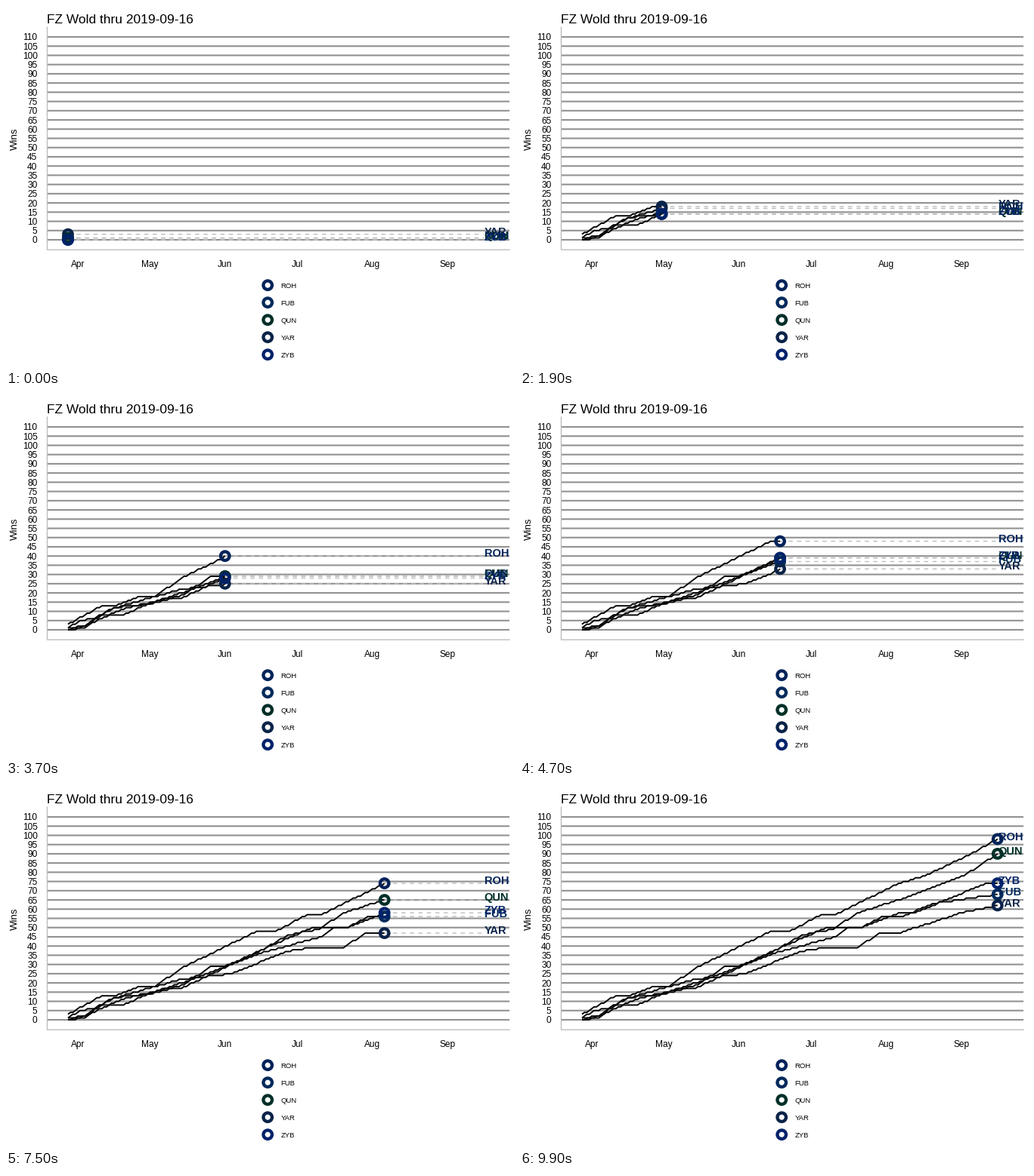
A matplotlib script that plays this animation: 672x480 px, repeating every 10000 ms.

```python
import numpy as np
import matplotlib.pyplot as plt
from matplotlib.animation import FuncAnimation
from matplotlib.patches import Circle

W, H = 672, 480
PT = 0.72                      # points per pixel at 100 dpi
FRAMES, LAST_DAY = 100, 172
LEFT, TOP, RIGHT, BOTTOM = 54.5, 28, 666, 323

plt.rcParams["font.family"] = "Liberation Sans"

# name -> (colour, turning points of the season as (day, wins))
TEAMS = {
    "ROH": ("#00235a", [
        (0, 1), (7, 2), (17, 11), (36, 18), (47, 28), (78, 48), (86, 48),
        (99, 57), (105, 57), (131, 74), (142, 78), (161, 90), (172, 98)]),
    "FUB": ("#002a5c", [
        (0, 0), (7, 1), (13, 8), (23, 8), (33, 14), (47, 20), (82, 37),
        (105, 45), (110, 50), (116, 50), (124, 56), (133, 56), (145, 63),
        (172, 68)]),
    "QUN": ("#002f28", [
        (0, 1), (5, 5), (11, 6), (19, 12), (34, 14), (48, 19), (59, 29),
        (65, 29), (101, 50), (105, 50), (114, 58), (131, 65), (158, 78),
        (172, 90)]),
    "YAR": ("#0a2348", [
        (0, 3), (14, 13), (20, 13), (29, 18), (36, 18), (47, 22), (68, 25),
        (90, 37), (100, 39), (114, 39), (123, 47), (131, 47), (157, 58),
        (172, 62)]),
    "ZYB": ("#00226b", [
        (0, 0), (7, 2), (22, 11), (41, 17), (47, 17), (82, 39), (91, 46),
        (107, 50), (116, 50), (131, 58), (138, 58), (167, 74), (172, 74)]),
}
MONTHS = {"Apr": 30, "May": 31, "Jun": 30, "Jul": 31, "Aug": 31, "Sep": 30}


def px(day):
    return 82 + 3.196 * day


def py(wins):
    return 310 - 2.4455 * wins


def pixel_axes(x0, y0, x1, y1):
    ax = fig.add_axes([x0 / W, 1 - y1 / H, (x1 - x0) / W, (y1 - y0) / H])
    ax.set(xlim=(x0, x1), ylim=(y1, y0))
    ax.patch.set_visible(False)
    ax.axis("off")
    return ax


def label(ax, x, y, text, size, **kw):
    kw = {"va": "baseline", "color": "black", **kw}
    return ax.text(x, y, text, fontsize=size * PT, **kw)


def ring(ax, x, y, color, **kw):
    return ax.add_patch(Circle((x, y), 5.75, fill=False, ec=color,
                               lw=4.3 * PT, **kw))


fig = plt.figure(figsize=(W / 100, H / 100), dpi=100, facecolor="white")
stage = pixel_axes(0, 0, W, H)
panel = pixel_axes(LEFT, TOP, RIGHT, BOTTOM)

for wins in range(0, 111, 5):
    panel.plot([LEFT, RIGHT], [py(wins)] * 2, color="#929292", lw=2.1 * PT,
               snap=False, zorder=1)
    label(stage, 41.5, py(wins) + 4.5, str(wins), 11.9, ha="right")
stage.plot([LEFT, LEFT, RIGHT], [TOP, BOTTOM + 0.2, BOTTOM + 0.2],
           color="#bebebe", lw=1.4 * PT, snap=False, zorder=1)

first = 4
for month, length in MONTHS.items():
    label(stage, px(first), 346, month, 11.9, ha="center")
    first += length
label(stage, 53.5, 23, "FZ Wold thru 2019-09-16", 17.4)
label(stage, 11.5, 176, "Wins", 13.3, rotation=90, ha="center", va="center")

days = np.arange(LAST_DAY + 1)
rows = []
for i, (name, (color, turns)) in enumerate(TEAMS.items()):
    y = 370.2 + 23 * i
    ring(stage, 346.2, y, color)
    label(stage, 363.5, y + 3.8, name, 9.5)

    # whole wins only, so the slopes become stairs
    wins = np.round(np.interp(days, *zip(*turns)))
    trail, = panel.plot([], [], color="black", lw=1.9 * PT, zorder=2,
                        solid_joinstyle="round", solid_capstyle="butt")
    guide, = panel.plot([], [], color="#bebebe", lw=1.4 * PT, zorder=3,
                        snap=False, dashes=(4, 4), dash_capstyle="butt")
    dot = ring(panel, 0, 0, color, zorder=4)
    tag = label(panel, 632.8, 0, name, 14.6, color=color, weight="bold",
                clip_on=True, zorder=5)
    rows.append((py(wins), trail, guide, dot, tag))


def update(frame):
    # the latest whole day that rounds onto this frame
    day = min(LAST_DAY, int((frame + 0.5) * LAST_DAY / (FRAMES - 1)))
    x = px(days[:day + 1])
    for ys, trail, guide, dot, tag in rows:
        y = ys[day]
        trail.set_data(x, ys[:day + 1])
        guide.set_data([x[-1], px(LAST_DAY)], [y, y])
        dot.set_center((x[-1], y))
        tag.set_y(y + 1.2)
    return [artist for row in rows for artist in row[1:]]


anim = FuncAnimation(fig, update, frames=FRAMES, interval=100, repeat=True,
                     repeat_delay=0, blit=False)
plt.show()
```
